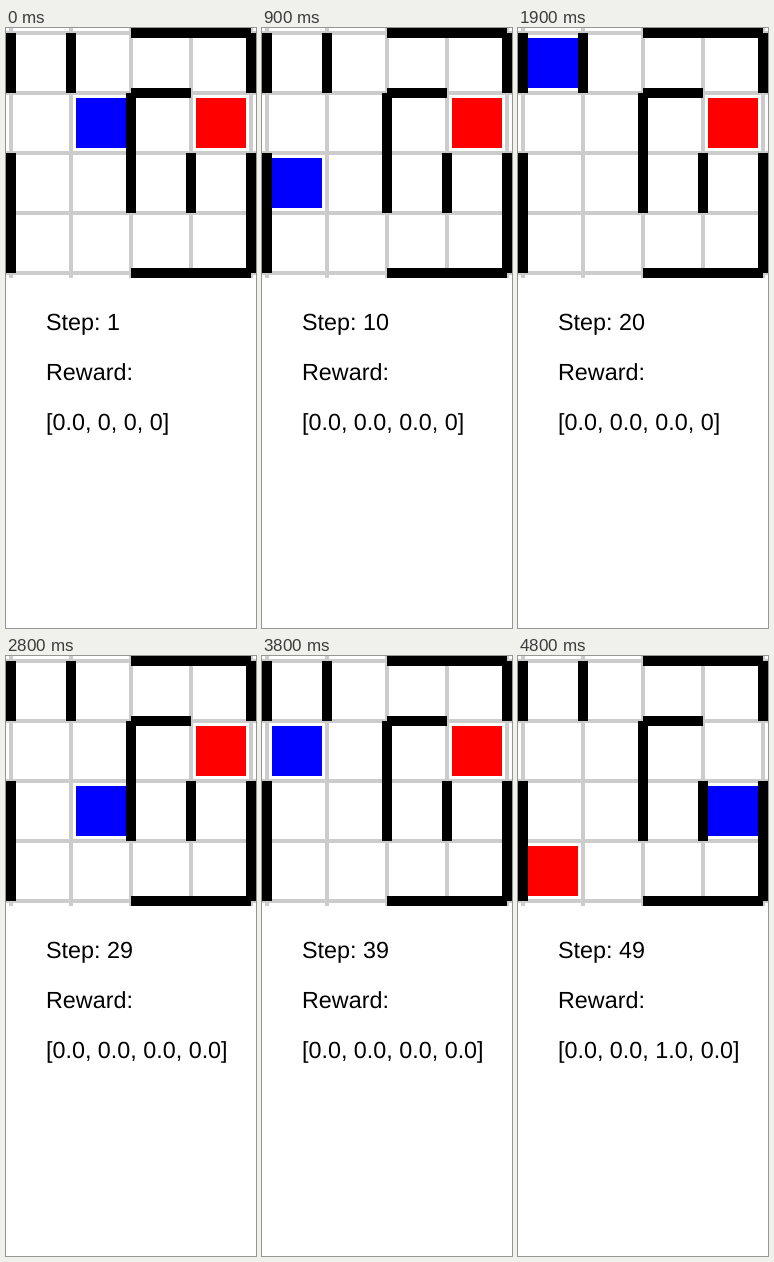
Recreate the animation shown at these times as an HTML page. Size 250 by 600 pixels, loop 4.9 s.

```html
<!DOCTYPE html>
<html lang="en">
<head>
<meta charset="utf-8">
<title>Grid walk</title>
<style>
  html, body { margin: 0; width: 100%; height: 100%; overflow: hidden; background: #fff; }
  svg { display: block; }
  text { font: 23.33px "Liberation Sans", Arial, sans-serif; text-rendering: geometricPrecision; }
</style>
</head>
<body>
<svg width="250" height="600" viewBox="0 0 250 600">
  <g shape-rendering="crispEdges">
    <path stroke="#ccc" stroke-width="4"
      d="M5 0V250M65 0V250M125 0V250M185 0V250M245 0V250M0 5H250M0 65H250M0 125H250M0 185H250M0 245H250"/>
    <rect id="goal" width="50" height="50" fill="#f00"/>
    <rect id="agent" width="50" height="50" fill="#00f"/>
    <path stroke="#000" stroke-width="10"
      d="M5 5V65M5 125V245M65 5V65M125 5H245M245 5V65M245 125V245M125 245H245M125 65H185M125 65V185M185 125V185"/>
  </g>
  <text id="step" x="40" y="302"></text>
  <text x="40" y="352">Reward:</text>
  <text id="rewards" x="40" y="402"></text>
</svg>
<script>
const STEP_MS = 100, CELL = 60, SIZE = 4;
const ACTIONS = 'UDLR';
const SHIFT = { U: [0, -1], D: [0, 1], L: [-1, 0], R: [1, 0] };
// Upper case moves one cell and wraps at open edges; lower case bumps into a wall.
const MOVES = 'uUDLDlDUllDUlUUlUDDUlrUUlDlRULDDlURDDrLLDlrUUurDD';

const wrap = n => (n + SIZE) % SIZE;
const byId = id => document.getElementById(id);

function simulate() {
  let agent = [1, 1], goal = [3, 1];
  const rewards = [null, null, null, null];
  return [...MOVES].map(move => {
    const action = move.toUpperCase();
    const index = ACTIONS.indexOf(action);
    if (move === action) agent = agent.map((n, axis) => wrap(n + SHIFT[action][axis]));
    const reached = agent.join() === goal.join();
    rewards[index] += reached ? 1 : 0;
    if (reached) goal = [0, 3];
    const list = rewards.map(r => r === null ? '0' : r.toFixed(1)).join(', ');
    return { agent, goal, list: `[${list}]` };
  });
}

function place(id, [col, row]) {
  byId(id).setAttribute('x', 10 + col * CELL);
  byId(id).setAttribute('y', 10 + row * CELL);
}

const states = simulate();

function draw(ms) {
  const i = Math.floor(ms / STEP_MS) % states.length;
  const { agent, goal, list } = states[i];
  place('agent', agent);
  place('goal', goal);
  byId('step').textContent = `Step: ${i + 1}`;
  byId('rewards').textContent = list;
}

const start = performance.now();
function tick() {
  draw(performance.now() - start);
  requestAnimationFrame(tick);
}
tick();
</script>
</body>
</html>
```
